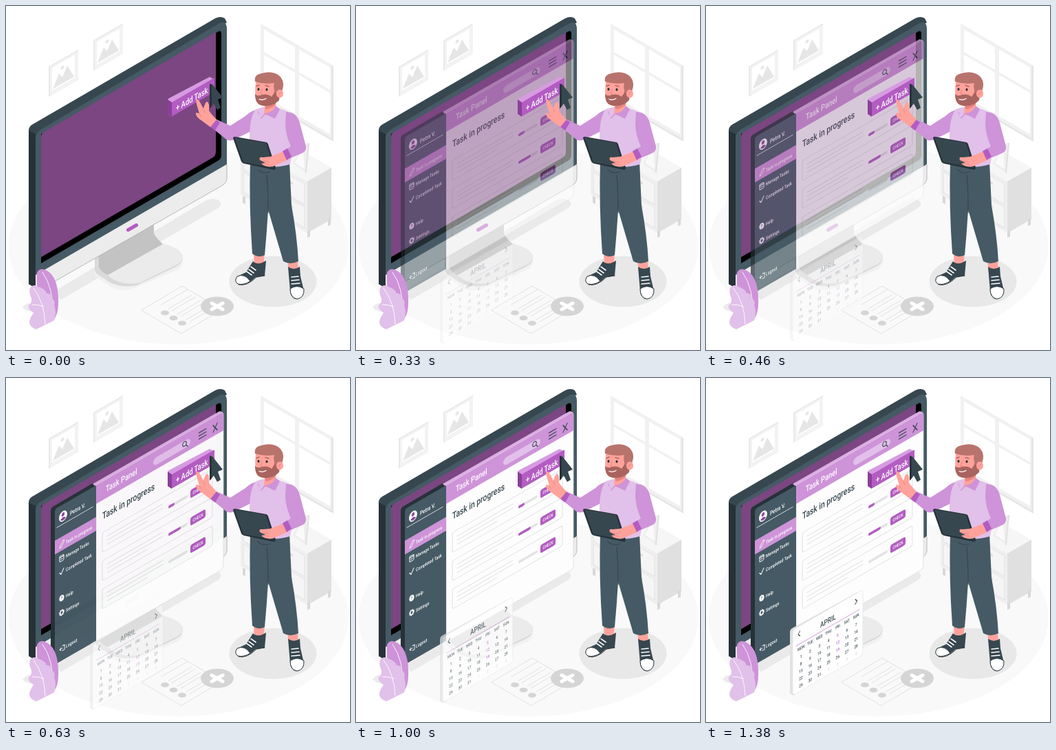
These frames come from a looping animation (500 by 500 pixels, 1.43 s). An HTML page:

```html
<!DOCTYPE html>
<html lang="en">
<head>
<meta charset="utf-8">
<style>
html, body { margin: 0; width: 100%; height: 100%; overflow: hidden; background: #fff }
svg { display: block; width: 100%; height: 100% }
text { font-family: Roboto, sans-serif; font-weight: 500 }
</style>
</head>
<body>
<svg id="stage" viewBox="0 0 500 500"></svg>
<script>
const LOOP = 1430, PANEL_FADE = 650, RISE = 40;
const DARK = '#37474f', SLATE = '#455a64', LILAC = '#ce93d8', PALE = '#e1c0e9', VIOLET = '#b35cc2', SKIN = '#ffa29b';

const path = (d, fill, extra = '') => `<path d="${d}" fill="${fill}" ${extra}/>`;
const line = (d, stroke, width = 1, extra = '') =>
  `<path d="${d}" fill="none" stroke="${stroke}" stroke-width="${width}" stroke-linecap="round" stroke-linejoin="round" ${extra}/>`;
const rect = (x, y, w, h, fill, r = 0, extra = '') =>
  `<rect x="${x}" y="${y}" width="${w}" height="${h}" rx="${r}" fill="${fill}" ${extra}/>`;
const oval = (x, y, rx, ry, fill, extra = '') =>
  `<ellipse cx="${x}" cy="${y}" rx="${rx}" ry="${ry}" fill="${fill}" ${extra}/>`;
// Isometric walls: everything inside is drawn flat, then sheared up or down to the right.
const wall = (x, y, content, slope = -0.577) => `<g transform="matrix(1 ${slope} 0 1 ${x} ${y})">${content}</g>`;
const label = (x, y, size, str, fill, extra = '') =>
  `<text transform="translate(${x} ${y}) scale(.75 1)" font-size="${size}" fill="${fill}" ${extra}>${str}</text>`;
const range = (n, fn) => Array.from({ length: n }, (_, i) => fn(i)).join('');

const picture = (x, y) => wall(x, y,
  rect(0, 0, 43, 44, '#e9e9e9') + rect(2, 2, 41, 42, '#f3f3f3') + rect(5, 5, 33, 33, '#fff') +
  path('M6 36L15 19 20 27 27 14 37 36Z', '#e6e6e6') + oval(20, 13, 2.5, 2.5, '#e6e6e6'));

const room = () =>
  oval(250.5, 349, 247, 143, '#f9f9f9') + picture(62, 88) + picture(127, 50) +
  wall(370, 26,
    rect(0, 0, 106, 110, '#e6e6e6', 1) + rect(0, 0, 103, 107, '#f1f1f1', 1) +
    [[5, 5, 33], [5, 42, 60], [56, 5, 33], [56, 42, 60]].map(([x, y, h]) => rect(x, y, 45, h, '#fff')).join(''), 0.577) +
  path('M341 199L376 179 473 235 438 255Z', '#f6f6f6') +
  path('M438 255L473 235V310L438 330Z', '#e0e0e0') +
  path('M438 328v9l4-2v-9zM468 310v10l4-2v-10zM344 275v11l4 2v-11z', '#d8d8d8') +
  wall(341, 199,
    rect(0, 0, 97, 75, '#efefef') +
    range(4, i => rect(4 + i % 2 * 47, 6 + (i >> 1) * 34, 42, 30, '#f5f5f5', 0, 'stroke="#e2e2e2"') +
      rect(20 + i % 2 * 47, 14 + (i >> 1) * 34, 9, 3, '#dcdcdc', 1.5)), 0.577) +
  path('M417 229L431 201 440 199 436 242Z', '#eee') + path('M420 228L432 204 434 237Z', '#fafafa') +
  line('M440 200L436 242', '#e0e0e0', 2);

const floorItems = () =>
  line('M197 442L256 407 314 441 255 476Z', '#e1e1e1') +
  range(3, i => oval(231 + i * 12.5, 446 + i * 7.5, 6, 3.6, '#d5d5d5') +
    line(`M${236 + i * 13} ${440 + i * 8}l34 -20m-29 23l34 -20`, '#e1e1e1')) +
  line('M226 434l38 -22', '#e1e1e1') +
  oval(307, 436.5, 24, 14, '#d5d5d5') + line('M299 432l16 9m0 -9l-16 9', '#fff', 5, 'stroke-linecap="butt"') +
  oval(388, 400.5, 63.5, 37, '#e8e8e8');

const monitor = () =>
  path('M68 416L288 284Q304 276 312 285 314 290 306 295L80 427Z', '#eaeaea') +
  path('M129 382V390Q135 398 148 405 165 418 184 411L250 383Q258 378 257 366Z', '#f1f1f1') +
  path('M133 389L148 400Q166 411 190 406L247 379Q258 374 257 362L215 340Z', '#d9d9d9') +
  path('M147 391L226 345Q256 352 257 365 256 373 246 377L195 402Q166 408 147 391Z', '#ebebeb') +
  path('M129 362L215 313V331Q218 337 228 346L148 391Q133 390 129 383Z', '#c3c3c3') +
  path('M129 362L135 361V380Q140 388 148 391V398Q130 392 129 383Z', '#dadada') +
  path('M33 181Q33 176 37 173L304 18Q312 14 318 18L321 24 60 190V404L43 410 33 404Z', DARK) +
  path('M33 181L43 186V410L33 404Z', '#263238') +
  path('M43 193Q43 184 50 180L307 27Q321 18 321 34V232L43 392Z', SLATE) +
  path('M43 391L321 230V250Q321 257 314 261L52 411 43 410Z', '#ececec') +
  line('M52 411L314 261Q321 257 321 250V231', '#a8a8a8', 0.8) +
  path('M51 186L307 38Q313 34 313 41V217Q313 222 308 225L51 374Z', '#000') +
  path('M51 190Q51 186 55 183L305 38V212Q305 217 301 220L51 365Z', '#7b4681') +
  line('M177.500 325.500L189.500 318.500', VIOLET, 5);

const panel = () => {
  const menu = [['Task in progress', 60], ['Manage Tasks', 80], ['Completed Task', 100], ['Help', 138], ['Settings', 159], ['Logout', 211]];
  const card = i => {
    const y = 74 + i * 41, mid = 92 + i * 40;
    return rect(9, y, 160, 29, 'none', 3, 'stroke="#dedede" stroke-width=".9"') +
      line(`M16 ${y + 9}h81m-81 6h81m-81 6h58`, '#dedede', 0.9) +
      rect(105, mid - 1.500, 28, 4, '#e3e3e3', 2) + (i < 2 ? rect(105, mid - 1.5, 9 + i * 9, 4, VIOLET, 2) : '') +
      rect(137, mid - 6, 22, 12, VIOLET, 2.5) + label(148, mid + 2.2, 6.3, 'CHECK', '#fff', 'text-anchor="middle"');
  };
  return path('M65 192Q65 189 68 187L126 153 131 156V165L71 198V417L65 414Z', '#263238') +
    path('M126 154L309 49Q312 47 316 51L131 158Z', '#dcaee4') +
    wall(131, 156,
      path('M0 0H181Q185 0 185 5V223Q185 228 180 228H0Z', '#fdfdfd', 'stroke="#dcdcdc" stroke-width=".8"') +
      path('M0 0H181Q185 0 185 5V27H0Z', LILAC) +
      path('M0 0H-56Q-60 0 -60 4V226H0Z', SLATE) +
      label(14, 18, 12.5, 'Task Panel', '#fff') +
      rect(83, 9.5, 54, 11, PALE, 5.5) +
      oval(128.5, 14, 2.8, 3.3, 'none', `stroke="${DARK}" stroke-width="1.100"`) + line('M131 17l2 3', DARK, 1.2) +
      line('M149.5 10h10.500m-10.500 4.500h10.500m-10.500 4.500h10.500M170 11l6 10m0 -10l-6 10', DARK, 1.3) +
      label(9, 55, 13.8, 'Task in progress', DARK) + range(3, card) +
      oval(-48, 17, 6, 7.5, '#fff') + oval(-48, 14.500, 2.2, 2.8, '#8e4a9b') + path('M-52 21q4 -5 8 0q-4 4 -8 0', '#8e4a9b') +
      label(-38, 22, 8.6, 'Petra V.', '#fff') + line('M-57 28.500H-5', '#fff', 0.9) +
      rect(-60, 46, 60, 20, LILAC) +
      menu.map(([str, y]) => label(-44, y, 7, str, '#fff')).join('') +
      line('M-53 61l1 -3 4 -6 2 1 -4 7z', '#fff', 0.8) +
      rect(-53, 73, 6, 8, 'none', 1, 'stroke="#fff"') + line('M-53 75h6m-4 3h2', '#fff', 1.2) +
      line('M-53 97l2 3 4 -7', '#fff', 1.2) +
      oval(-50, 135, 3.6, 4.5, '#fff') + label(-50, 137.5, 6.500, '?', SLATE, 'text-anchor="middle"') +
      oval(-50, 156, 2.4, 3, 'none', 'stroke="#fff" stroke-width="1.800"') + oval(-50, 156, 3.4, 4.2, 'none', 'stroke="#fff" stroke-dasharray="1.500 1.500"') +
      line('M-49 205h3v7h-3M-53 208.500h4m-2 -2l-2 2 2 2', '#fff', 0.9));
};

const calendar = () => {
  const centred = 'text-anchor="middle"';
  const days = ['MON', 'TUE', 'WED', 'THU', 'FRI', 'SAT', 'SUN'];
  const x = col => 12 + col * 13.35;
  const date = i => {
    const col = i % 7, row = (i - col) / 7, next = i > 30;
    const fill = next ? '#d5d5d5' : col === 4 && row < 3 ? VIOLET : DARK;
    return label(x(col), 47.5 + row * 10.5, 6.2, next ? i - 30 : i + 1, fill, centred);
  };
  return path('M122 368Q122 364 126 362L220 310 228 314 130 372V459L126 460 122 457Z', '#e2e2e2') +
    wall(126, 365,
      rect(0, 0, 102, 95, '#fff', 4, 'stroke="#e6e6e6" stroke-width=".8"') +
      label(40, 20, 11, 'APRIL', DARK, 'font-weight="700"') +
      line('M10.5 7.500l-2.500 3.500 2.500 3.500M91 8l2.500 3.500 -2.500 3.500', DARK, 1.1) +
      line('M5 26H97', LILAC, 0.9) +
      days.map((d, i) => label(x(i), 35, 6, d, DARK, centred)).join('') + range(35, date));
};

const button = () =>
  path('M235 137Q235 135 237 134L296 103 303 107 241 142V161L235 157Z', '#d79be2') +
  path('M235 136L241 140V161L235 157Z', '#8b3f99') +
  wall(241, 140, rect(0, 0, 62, 20.500, VIOLET, 1) + label(6, 16.5, 12.6, '+ Add Task', '#fff', 'font-weight="700"')) +
  path('M296 113L300 114 315 133 308 136 312 148 307 151 302 142 296 149Z', DARK) +
  path('M296 113L299 115V146L296 149Z', '#263238');

const plant = () =>
  path('M24 438Q32 428 40 434L42 444Q30 445 24 438Z', '#ececec') +
  path('M45 388Q49 379 60 385 75 394 76 424 77 446 70 455L58 454Q43 421 45 388Z', LILAC) +
  line('M53 387Q70 410 68 452', '#fff', 0.9) +
  path('M35 410Q40 403 47 408 59 412 58 417 67 418 65 423 73 429 70 435 74 445 70 457L44 470Q33 466 34 458 36 451 40 446 31 440 33 435 38 431 37 425 33 417 35 410Z', PALE) +
  line('M40 410Q56 431 57 462M38 434Q48 434 55 437', '#fff', 0.9);

const shoe = (d, toe, laces) => path(d, DARK) + path(toe, '#fff', 'stroke="#263238" stroke-width="1"') + line(laces, '#fff', 1.6);

const man = () =>
  path('M360 360L361 378 374 378 376 360ZM409 370L411 386 425 384 424 370Z', SKIN) +
  shoe('M359 371Q366 378 378 370L376 392 363 394Q350 407 337 404 332 400 336 393L349 387Z',
    'M336 393Q347 388 355 400 346 406 337 404 331 400 336 393Z', 'M350 386l7 5m-4 -8l7 5m-4 -9l7 5') +
  line('M338 405Q350 408 364 394L376 392', '#263238', 1) +
  shoe('M410 379Q418 385 427 379L428 393 433 414Q431 426 421 426 414 424 413 415Z',
    'M413 411Q423 404 433 411 434 424 423 426 413 424 413 411Z', 'M415 394l10 -1m-10 6l11 -1m-11 6l12 -1') +
  path('M355 226H412L415 290Q423 334 425 371 413 377 403 371L381 296Q379 330 376 362 367 367 358 360 353 290 355 226Z', SLATE) +
  line('M366 238Q374 245 383 241M379 246Q381 264 381 300', DARK, 1.3) +
  path('M366 151Q357 151 348 160L326 174 304 164 297 175 319 193Q325 198 334 193L362 179Z', LILAC) +
  path('M303 164L311 169 304 181 296 175Z', VIOLET) +
  path('M306 165L297 176 285 167Q275 161 276 155L281 156Q277 144 276 137 279 134 282 140L287 149Q290 139 292 139 296 140 295 152 298 157 306 165Z', SKIN) +
  line('M281 157L284 161M287 150L289 155', '#e98580', 0.9) +
  path('M363 150Q382 142 409 153 419 162 420 194L413 230Q387 238 355 230L354 189Q354 162 363 150Z', PALE) +
  path('M407 154Q423 154 427 170L436 204Q437 212 428 215L409 223 404 211 414 204Q406 186 406 171Z', LILAC) +
  path('M376 140L392 137V151Q388 161 375 158Z', SKIN) + path('M377 144Q386 144 392 137V143Q386 150 377 150Z', '#e98580') +
  path('M374 147L367 153 370 163 376 156Q387 156 392 145L398 150 391 164 377 157 371 164 366 154Z', LILAC) +
  path('M363 111Q377 103 393 112L394 139Q381 147 368 143 360 139 363 111Z', SKIN) +
  path('M362 128Q366 132 372 129 381 127 386 132 390 127 392 120L399 122 397 137Q387 147 374 145 362 144 362 128Z', '#a9645f') +
  path('M362 110Q360 100 371 98 389 93 399 103 406 112 401 124L396 129 391 126Q388 117 390 112 375 114 362 110Z', '#b9736d') +
  oval(398, 127.500, 5, 6, SKIN) + line('M397 129Q397 125 400 125', '#e98580', 1) +
  oval(367, 121, 1.500, 1.900, '#263238') + oval(379, 121.500, 1.500, 1.900, '#263238') +
  line('M364 116.500l4 -1.500M377 115.500l5 1.500', '#8f504b', 1.300) + line('M372 121L370 128 373 128', '#e98580', 1) +
  line('M368 135.500Q373 137.500 378 134.500', '#fff', 1.300) +
  path('M330 192Q330 190 333 190L378 198Q380 198 381 201L392 235Q392 238 389 238L346 229Q343 228 342 226Z', '#263238') +
  path('M332 191L378 199 389 235 345 227Z', DARK) +
  path('M407 210L411 223 393 231Q385 236 375 232L371 229 377 228 369 224Q367 219 373 220L384 219Z', SKIN) +
  line('M372 225L382 227M375 229L382 230', '#e98580', 0.9) +
  path('M402 211L409 207 415 219 408 224Z', VIOLET);

stage.innerHTML = room() + floorItems() + monitor() +
  `<g id="panelLayer">${panel()}</g><g id="calendarLayer">${calendar()}</g>` + plant() + button() + man();

function draw() {
  const t = performance.now() % LOOP, progress = t / LOOP;
  panelLayer.setAttribute('opacity', Math.min(1, t / PANEL_FADE));
  calendarLayer.setAttribute('opacity', progress);
  calendarLayer.setAttribute('transform', `translate(0 ${RISE * (1 - progress)})`);
  requestAnimationFrame(draw);
}
draw();
</script>
</body>
</html>
```
